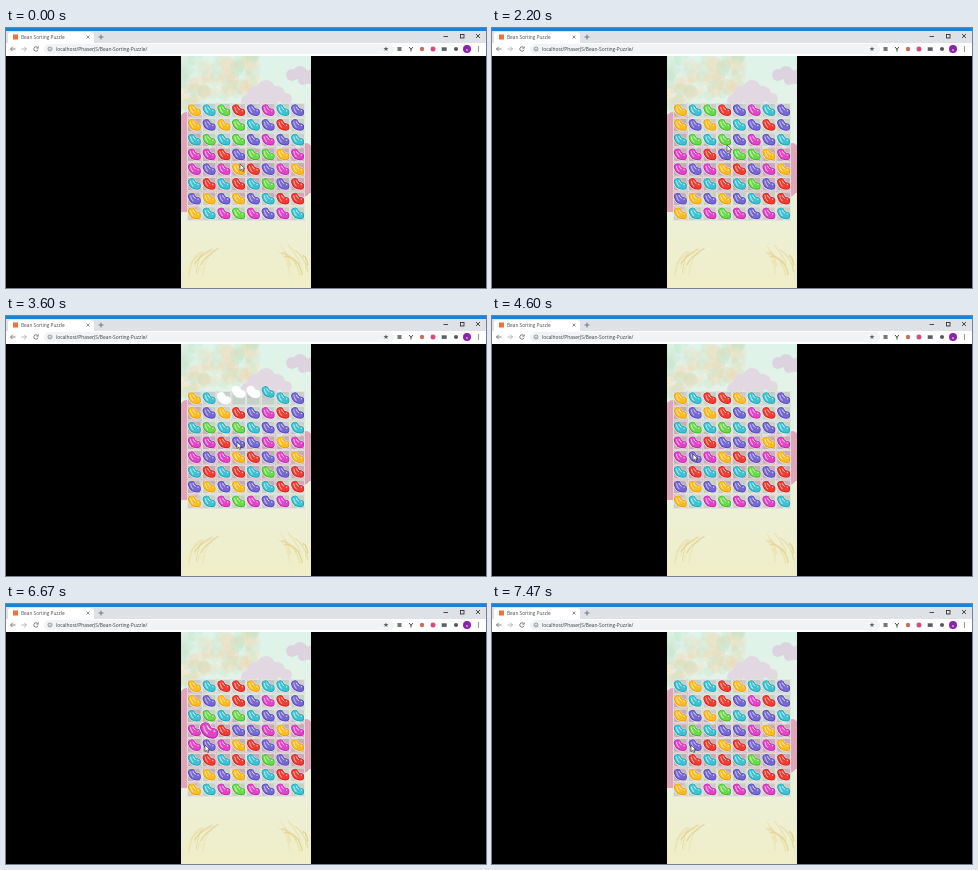
Recreate the animation shown at these times as an HTML page with a canvas. Size 480 by 260 pixels, loop 8 s.

```html
<!DOCTYPE html>
<html lang="en">
<head>
<meta charset="utf-8">
<title>Bean Sorting Puzzle</title>
<style>
  html, body { margin: 0; width: 100%; height: 100%; overflow: hidden; background: #000; }
  canvas { display: block; }
</style>
</head>
<body>
<canvas id="stage" width="480" height="260"></canvas>
<script>
const LOOP = 8000;
const CELL = 14.75, LEFT = 181, TOP = 75;
const stage = document.getElementById('stage').getContext('2d');

// [edge, body, light]
const COLORS = {
  O: ['#e59a18', '#ffbd21', '#ffe28a'],
  C: ['#219fae', '#3fc1d2', '#a5eaf0'],
  M: ['#b72aa6', '#e244c6', '#f8a6e6'],
  R: ['#c62422', '#f23c32', '#ff9d90'],
  V: ['#5146ae', '#7668d2', '#bcb4f0'],
  G: ['#42ab2f', '#6ad94c', '#bdf5a4'],
  W: ['#ffffff', '#ffffff', '#ffffff']
};

const START = ['OCGRVMCV', 'OVOGCVRV', 'CGCGVMVC', 'MMRVGGOM',
               'MVMORVMO', 'CRCRCGVR', 'VOVOVCRR', 'OCMGMVMC'].map(row => [...row]);

function swapped(board, [r1, c1], [r2, c2]) {
  const next = board.map(row => row.slice());
  [next[r1][c1], next[r2][c2]] = [next[r2][c2], next[r1][c1]];
  return next;
}

// Removes one bean per column in the given row and drops the rest.
function collapsed(board, row, firstCol, fresh) {
  const next = board.map(line => line.slice());
  [...fresh].forEach((color, i) => {
    const c = firstCol + i;
    for (let r = row; r > 0; r--) next[r][c] = next[r - 1][c];
    next[0][c] = color;
  });
  return next;
}

const firstSwap = swapped(START, [2, 3], [3, 3]);
const firstFall = collapsed(firstSwap, 3, 3, 'GGC');
const cascade = collapsed(firstFall, 0, 2, 'RRO');
const lastSwap = swapped(cascade, [3, 1], [4, 1]);
const lastFall = collapsed(lastSwap, 4, 0, 'COC');

const phases = [
  { at: 0, board: START },
  { at: 2900, board: START, kind: 'select', from: [2, 3] },
  { at: 3130, board: START, kind: 'swap', from: [2, 3], to: [3, 3], dur: 120 },
  { at: 3260, board: firstSwap, kind: 'flash', row: 3, col: 3 },
  { at: 3340, board: firstFall, kind: 'fall', row: 3, col: 3, dur: 293, flashAt: 3580 },
  { at: 3680, board: cascade, kind: 'fall', row: 0, col: 2, dur: 200 },
  { at: 3890, board: cascade },
  { at: 6470, board: cascade, kind: 'select', from: [3, 1] },
  { at: 6830, board: cascade, kind: 'swap', from: [3, 1], to: [4, 1], dur: 120 },
  { at: 6950, board: lastSwap, kind: 'flash', row: 4, col: 0 },
  { at: 7070, board: lastFall, kind: 'fall', row: 4, col: 0, dur: 340 },
  { at: 7420, board: lastFall }
];

// [time, x, y] of the pointer tip
const pointer = [
  [0, 234, 136], [70, 234, 136], [330, 236, 129], [800, 237, 121], [1330, 236, 119],
  [2200, 235, 117], [2900, 232, 112], [3200, 231, 126], [3870, 231, 126],
  [4270, 222, 132], [4600, 201, 138], [5100, 201, 139], [5900, 201, 131],
  [6400, 201, 126], [6600, 199, 140], [6670, 199, 141], [8000, 199, 141]
];

const clamp = x => Math.max(0, Math.min(1, x));
const lerp = (a, b, k) => a + (b - a) * k;
const smooth = k => k * k * (3 - 2 * k);

function pointerAt(t) {
  const i = Math.max(1, pointer.findIndex(p => p[0] > t));
  const a = pointer[i - 1], b = pointer[i];
  const k = smooth(clamp((t - a[0]) / (b[0] - a[0])));
  return [lerp(a[1], b[1], k), lerp(a[2], b[2], k)];
}

function seeded(seed) {
  return () => (seed = (seed * 16807) % 2147483647) / 2147483647;
}

function disc(g, x, y, r, color) {
  g.fillStyle = color;
  g.beginPath();
  g.arc(x, y, r, 0, Math.PI * 2);
  g.fill();
}

function line(g, color, width, ...points) {
  g.strokeStyle = color;
  g.lineWidth = width;
  g.beginPath();
  points.forEach(([x, y]) => g.lineTo(x, y));
  g.stroke();
}

function text(g, str, x, y, size, color) {
  g.fillStyle = color;
  g.font = size + 'px "Open Sans", sans-serif';
  g.fillText(str, x, y);
}

function drawChrome(g) {
  g.fillStyle = '#dee1e6';
  g.fillRect(0, 0, 480, 15);
  g.fillStyle = '#1b84d6';
  g.fillRect(0, 0, 480, 3);
  g.fillStyle = '#fff';
  g.beginPath();
  g.roundRect(2, 4, 86, 14, 3);
  g.fill();
  g.fillRect(0, 15, 480, 13);

  g.fillStyle = '#f0743a';
  g.fillRect(7, 6.5, 5, 5);
  text(g, 'Bean Sorting Puzzle', 15, 10.8, 4.75, '#4a4d52');
  const gray = '#5f6368';
  line(g, gray, 0.7, [80.5, 7.5], [83.5, 10.5]);
  line(g, gray, 0.7, [83.5, 7.5], [80.5, 10.5]);
  line(g, gray, 0.8, [92.5, 9], [97.5, 9]);
  line(g, gray, 0.8, [95, 6.5], [95, 11.5]);
  line(g, '#222', 0.8, [437.5, 8.5], [442, 8.5]);
  g.strokeRect(454.5, 6.5, 3.5, 3.5);
  line(g, '#222', 0.8, [470, 6], [474, 10]);
  line(g, '#222', 0.8, [474, 6], [470, 10]);

  line(g, gray, 0.8, [9.5, 21], [4.5, 21]);
  line(g, gray, 0.8, [6.8, 18.7], [4.5, 21], [6.8, 23.3]);
  line(g, '#a5a8ac', 0.8, [15.5, 21], [20.5, 21]);
  line(g, '#a5a8ac', 0.8, [18.2, 18.7], [20.5, 21], [18.2, 23.3]);
  g.strokeStyle = gray;
  g.beginPath();
  g.arc(30, 21, 2.2, 0.3, 5.4);
  g.stroke();
  line(g, gray, 0.8, [32.2, 18.3], [32.2, 20.2], [30.4, 20.2]);

  g.fillStyle = '#f1f3f4';
  g.beginPath();
  g.roundRect(38, 16, 350, 10, 5);
  g.fill();
  g.strokeStyle = gray;
  g.lineWidth = 0.6;
  g.beginPath();
  g.arc(44, 21, 2, 0, 7);
  g.stroke();
  line(g, gray, 0.7, [44, 20.6], [44, 22.1]);
  text(g, 'localhost/PhaserJS/Bean-Sorting-Puzzle/', 50, 22.9, 4.9, '#3a3d41');

  g.fillStyle = gray;
  g.beginPath();
  for (let i = 0; i < 10; i++) {
    const a = i * Math.PI / 5 - Math.PI / 2, r = i % 2 ? 1.1 : 2.6;
    g.lineTo(380 + r * Math.cos(a), 21 + r * Math.sin(a));
  }
  g.fill();
  g.fillStyle = '#777';
  g.fillRect(391.5, 19, 4, 4);
  line(g, '#444', 1, [403, 19], [405, 21.3], [407, 19]);
  line(g, '#444', 1, [405, 21], [405, 23.5]);
  disc(g, 416, 21, 2.2, '#c1705f');
  disc(g, 427, 21, 2.5, '#d64c7d');
  g.fillStyle = '#5c6065';
  g.fillRect(435.7, 19.3, 5, 3.6);
  disc(g, 450, 21, 2.1, '#565a60');
  disc(g, 461, 21, 4, '#8e24aa');
  text(g, 'a', 459.8, 22.5, 4.2, '#fff');
  for (const y of [19, 21, 23]) disc(g, 472.5, y, 0.65, gray);
}

function cloud(g, color, puffs) {
  puffs.forEach(([x, y, r]) => disc(g, x, y, r, color));
}

function drawScenery(g) {
  const sky = g.createLinearGradient(0, 28, 0, 260);
  sky.addColorStop(0, '#def3ea');
  sky.addColorStop(0.4, '#e8f2e5');
  sky.addColorStop(0.72, '#edf0d6');
  sky.addColorStop(1, '#efeec8');
  g.fillStyle = sky;
  g.fillRect(175, 28, 130, 232);

  const rand = seeded(41);
  g.globalAlpha = 0.3;
  const washes = ['#f2d3ac', '#c4e3c6', '#f5dfb9', '#cce7cf'];
  for (let i = 0; i < 100; i++) {
    const x = 174 + rand() * 76, y = 26 + rand() * (54 - (x - 174) * 0.25);
    disc(g, x, y, 3 + rand() * 5, washes[x + y < 234 ? 1 + 2 * (i % 2) : i % 4]);
  }
  g.globalAlpha = 1;
  cloud(g, '#ddd3df', [[286, 47, 6], [294, 45, 7], [303, 49, 7], [297, 52, 5]]);
  cloud(g, '#e1d8e1', [[249, 66, 8], [260, 61, 9], [271, 66, 8], [280, 71, 6], [243, 74, 8], [262, 73, 10]]);

  const pink = '#dfa5b9';
  g.fillStyle = pink;
  g.fillRect(175, 88, 10, 96);
  g.fillRect(175, 121, 130, 44);
  cloud(g, pink, [[181, 91, 7], [192, 93, 7], [201, 96, 5], [187, 105, 9], [194, 120, 9],
    [212, 124, 8], [228, 121, 6], [245, 125, 7], [264, 121, 7], [283, 124, 8], [300, 121, 6],
    [184, 172, 11], [203, 162, 9], [234, 163, 8], [268, 162, 8], [297, 162, 7]]);

  g.globalAlpha = 0.55;
  g.lineCap = 'round';
  for (const [base, dir] of [[188, 1], [291, -1]]) {
    for (let i = 0; i < 9; i++) {
      const x = base + (rand() - 0.5) * 22, lean = dir * (4 + rand() * 15);
      g.strokeStyle = i % 3 ? '#e9d793' : '#d8c078';
      g.lineWidth = 0.7 + rand();
      g.beginPath();
      g.moveTo(x, 249 - rand() * 14);
      g.quadraticCurveTo(x + lean * 0.2, 229, x + lean, 217 + rand() * 13);
      g.stroke();
    }
  }
  g.globalAlpha = 1;
  g.lineCap = 'butt';
}

function drawTiles(g) {
  for (let r = 0; r < 8; r++) {
    for (let c = 0; c < 8; c++) {
      const x = LEFT + c * CELL, y = TOP + r * CELL;
      g.fillStyle = 'rgba(176,180,178,.55)';
      g.fillRect(x, y, CELL, CELL);
      g.strokeStyle = 'rgba(238,240,234,.8)';
      g.lineWidth = 0.9;
      g.strokeRect(x + 0.6, y + 0.6, CELL - 1.2, CELL - 1.2);
    }
  }
}

function makeBackdrop() {
  const canvas = document.createElement('canvas');
  canvas.width = 480;
  canvas.height = 260;
  const g = canvas.getContext('2d');
  g.fillStyle = '#000';
  g.fillRect(0, 0, 480, 260);
  g.save();
  g.beginPath();
  g.rect(175, 28, 130, 232);
  g.clip();
  drawScenery(g);
  drawTiles(g);
  g.restore();
  drawChrome(g);
  return canvas;
}

function drawBean(g, row, col, color, scale = 1) {
  const [edge, body, light] = COLORS[color];
  const curve = (stroke, width, x0, y0, cx, cy, x1, y1) => {
    g.strokeStyle = stroke;
    g.lineWidth = width;
    g.beginPath();
    g.moveTo(x0, y0);
    g.quadraticCurveTo(cx, cy, x1, y1);
    g.stroke();
  };
  g.save();
  g.translate(LEFT + (col + 0.5) * CELL, TOP + (row + 0.5) * CELL);
  g.scale(scale, scale);
  g.lineCap = 'round';
  curve('rgba(255,255,255,.75)', 8.6, -2.7, -2.2, -1.5, 1.9, 2.8, 1.9);
  curve(edge, 7.5, -2.7, -2.2, -1.5, 1.9, 2.8, 1.9);
  curve(body, 6.1, -2.6, -2.4, -1.3, 1.7, 2.8, 1.6);
  curve(light, 1.2, -3.9, -3, -3.3, 0.4, -1.4, 2);
  curve('rgba(255,255,255,.8)', 0.9, -1.4, -3.4, -0.7, -1.2, 1, -0.5);
  disc(g, 3.7, 0.4, 0.7, 'rgba(255,255,255,.7)');
  g.restore();
}

function drawBeans(g, t) {
  const phase = phases.findLast(p => p.at <= t);
  const { board, kind, from, to, row, col, at, dur, flashAt } = phase;
  const k = dur ? clamp((t - at) / dur) : 0;
  const same = (cell, r, c) => cell && cell[0] === r && cell[1] === c;
  let onTop = null;
  board.forEach((lineOfBeans, r) => lineOfBeans.forEach((color, c) => {
    let y = r, x = c, shown = color;
    const inMatch = c >= col && c < col + 3;
    if (same(from, r, c)) {
      if (kind === 'swap') {
        y = lerp(r, to[0], k);
        x = lerp(c, to[1], k);
      }
      const grow = kind === 'select' ? clamp((t - at) / 100) : 1 - k;
      onTop = [y, x, color, 1 + 0.42 * grow];
      return;
    }
    if (kind === 'swap' && same(to, r, c)) {
      y = lerp(r, from[0], k);
      x = lerp(c, from[1], k);
    }
    if (kind === 'flash' && inMatch && r === row) shown = 'W';
    if (kind === 'fall' && inMatch && r <= row) {
      y = r === 0 ? lerp(-3.9, 0, k) : r - 1 + clamp(k * 2);
    }
    if (flashAt && t >= flashAt && r === 0 && c >= 2 && c <= 4) shown = 'W';
    drawBean(g, y, x, shown);
  }));
  if (onTop) drawBean(g, ...onTop);
}

function drawPointer(g, t) {
  const [x, y] = pointerAt(t);
  g.save();
  g.translate(x, y);
  g.beginPath();
  [[0, 0], [0, 6.6], [1.6, 5.2], [2.7, 7.6], [3.8, 7.1], [2.8, 4.8], [4.8, 4.7]]
    .forEach(p => g.lineTo(...p));
  g.closePath();
  g.fillStyle = '#fff';
  g.fill();
  g.strokeStyle = '#222';
  g.lineWidth = 0.6;
  g.stroke();
  g.restore();
}

const backdrop = makeBackdrop();
const began = performance.now();

function frame(now) {
  const t = Math.max(0, now - began) % LOOP;
  stage.drawImage(backdrop, 0, 0);
  stage.save();
  stage.beginPath();
  stage.rect(175, 28, 130, 232);
  stage.clip();
  drawBeans(stage, t);
  stage.restore();
  drawPointer(stage, t);
  requestAnimationFrame(frame);
}

frame(began);
</script>
</body>
</html>
```
